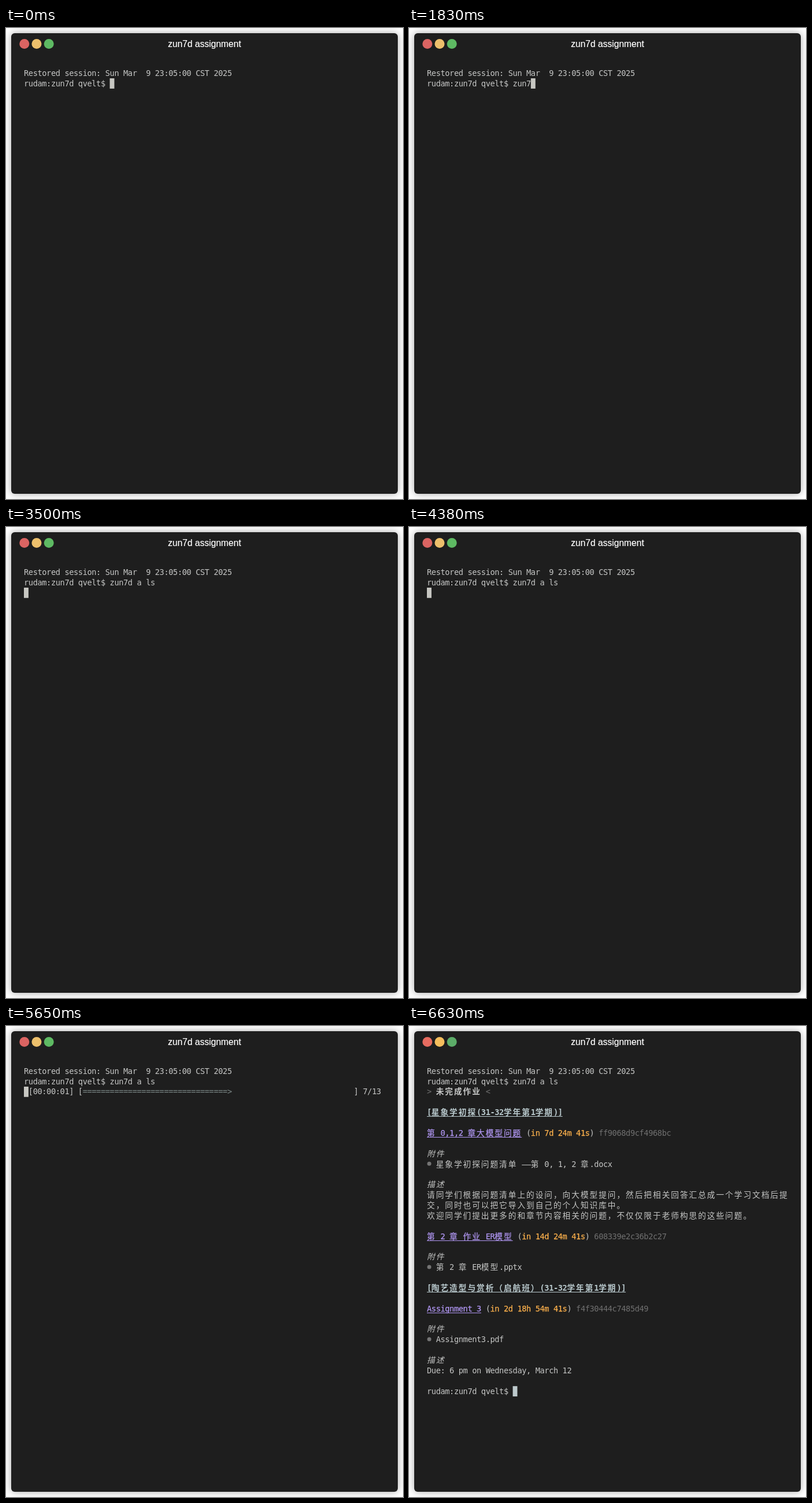
Write an HTML page that moves like this. It is 687x815 px and loops after 8000 ms.

```html
<!DOCTYPE html>
<html lang="zh-CN">
<head>
<meta charset="utf-8">
<title>Terminal</title>
<style>
  html, body { margin: 0; width: 100%; height: 100%; overflow: hidden; background: #fff; }
  #win { position: absolute; left: 9px; top: 9px; width: 669px; height: 797px; border-radius: 6px;
         background: #1e1e1e; box-shadow: 0 0 14px rgba(0, 0, 0, .34); }
  svg { position: absolute; left: 0; top: 0; display: block; }
  text { white-space: pre; }
  .title { font: 15.6px "Liberation Sans", Arial, sans-serif; fill: #fff; text-anchor: middle;
           stroke: #fff; stroke-width: .2px; }
  #screen text { font: 13.7px "DejaVu Sans Mono", "Noto Sans CJK SC", "Noto Sans CJK", monospace; fill: #c5c6c5; }
  #screen .bold { font-weight: bold; }
  #screen .ital { font-style: italic; }
  #screen .head { font-weight: bold; fill: #b9c9cd; }
  #screen .link { fill: #b096f2; stroke: #b096f2; stroke-width: .25px; }
  #screen .due { fill: #fbb04c; stroke: #fbb04c; stroke-width: .25px; }
  #screen .dim { fill: #707070; }
  #screen .bar { fill: #7d8988; }
</style>
</head>
<body>
<div id="win"></div>
<svg width="687" height="815" viewBox="0 0 687 815">
  <g id="dots"></g>
  <text class="title" x="343.5" y="33">zun7d assignment</text>
  <g id="screen"></g>
</svg>
<script>
const LOOP = 8000;
const LEFT = 31, TOP = 69.2, CELL = 7.82, ROW = 17.87, BASE = 13.5;
const PROMPT = "rudam:zun7d qvelt$ ";
const COMMAND = "zun7d a ls";
const KEYS = [1360, 1420, 1680, 1830, 2060, 2230, 2320, 2420, 2730, 2850];
const ENTER = 3500, BAR = 4600, DONE = 6630;

// Progress: time, position, length
const STEPS = [
  [BAR, 0, 2], [4840, 1, 2], [5000, 2, 2],
  [5200, 4, 13], [5490, 6, 13], [5650, 7, 13], [5830, 8, 13], [6460, 9, 13]
];

const TERM = "(31-32学年第1学期)";
const files = ["附件", "ital"], about = ["描述", "ital"];
const task = (name, left, id) =>
  [[name, "link"], [" ("], ["in " + left, "due"], [") "], [id, "dim"]];
const course = name => [["[" + name + TERM + "]", "head"]];
const file = name => [["●", "dim"], [" " + name]];

// Rows of styled runs, starting under the command line
const REPORT = [
  [["> ", "dim"], ["未完成作业", "bold"], [" <", "dim"]],
  [],
  course("星象学初探"),
  [],
  task("第 0,1,2 章大模型问题", "7d 24m 41s", "ff9068d9cf4968bc"),
  [],
  [files],
  file("星象学初探问题清单 ——第 0, 1, 2 章.docx"),
  [],
  [about],
  [["请同学们根据问题清单上的设问，向大模型提问，然后把相关回答汇总成一个学习文档后提"]],
  [["交，同时也可以把它导入到自己的个人知识库中。"]],
  [["欢迎同学们提出更多的和章节内容相关的问题，不仅仅限于老师构思的这些问题。"]],
  [],
  task("第 2 章 作业 ER模型", "14d 24m 41s", "608339e2c36b2c27"),
  [],
  [files],
  file("第 2 章 ER模型.pptx"),
  [],
  course("陶艺造型与赏析（启航班）"),
  [],
  task("Assignment 3", "2d 18h 54m 41s", "f4f30444c7485d49"),
  [],
  [files],
  file("Assignment3.pdf"),
  [],
  [about],
  [["Due: 6 pm on Wednesday, March 12"]],
  [],
  [[PROMPT]]
];

const dots = document.getElementById("dots");
const screen = document.getElementById("screen");

function add(parent, tag, attrs, content) {
  const el = document.createElementNS("http://www.w3.org/2000/svg", tag);
  for (const k in attrs) el.setAttribute(k, attrs[k]);
  if (content) el.textContent = content;
  parent.appendChild(el);
}

const colX = col => LEFT + col * CELL;
const rowY = row => TOP + row * ROW;
const span = ch => ch.codePointAt(0) >= 0x2e80 ? 2 : 1;

// Draws one run on the character grid and returns the next free column
function run(row, col, content, style = "") {
  if (content === "●") {
    add(screen, "circle", { cx: colX(col) + 4, cy: rowY(row) + 8.3, r: 3.5, fill: "#747474" });
    return col + 1;
  }
  const start = col, xs = [];
  for (const ch of content) {
    xs.push(colX(col).toFixed(2));
    col += span(ch);
  }
  add(screen, "text", { x: xs.join(" "), y: rowY(row) + BASE, class: style }, content);
  if (style === "link" || style === "head") {
    add(screen, "rect", {
      x: colX(start), y: Math.round(rowY(row) + 15.6), width: (col - start) * CELL, height: 1,
      fill: style === "link" ? "#b096f2" : "#b9c9cd"
    });
  }
  return col;
}

function line(row, runs) {
  return runs.reduce((col, [content, style]) => run(row, col, content, style), 0);
}

function cursor(row, col, fill = "#c7c7c2") {
  add(screen, "rect", { x: colX(col), y: rowY(row), width: 7.9, height: 17.8, fill });
}

function lights(done) {
  const fills = done ? ["#e76c60", "#f5be5d", "#5cac68"] : ["#db6462", "#edc06c", "#5eba63"];
  dots.replaceChildren();
  fills.forEach((fill, i) => add(dots, "circle", { cx: 31.8 + i * 21.2, cy: 27.4, r: 8.5, fill }));
}

function progress([, pos, len], secs) {
  const full = Math.floor(60 * pos / len);
  const bar = "=".repeat(full) + (full < 60 ? ">" : "");
  line(2, [[" [00:00:0" + secs + "] ["], [bar.padEnd(60), "bar"], ["] " + pos + "/" + len]]);
}

let shown = "";

function draw(t) {
  const typed = KEYS.filter(k => k <= t).length;
  const step = STEPS.filter(s => s[0] <= t).pop();
  const secs = t >= BAR + 1000 ? 1 : 0;
  const done = t >= DONE;
  const key = [typed, t >= ENTER, step, secs, done].join();
  if (key === shown) return;
  shown = key;

  lights(done);
  screen.replaceChildren();
  run(0, 0, "Restored session: Sun Mar  9 23:05:00 CST 2025");
  const end = run(1, 0, PROMPT + COMMAND.slice(0, typed));
  if (done) {
    REPORT.forEach((runs, i) => line(i + 2, runs));
    cursor(REPORT.length + 1, PROMPT.length, "#bdc9cc");
  } else if (t >= ENTER) {
    if (step) progress(step, secs);
    cursor(2, 0);
  } else {
    cursor(1, end);
  }
}

const began = performance.now();
function tick() {
  draw((performance.now() - began) % LOOP);
  requestAnimationFrame(tick);
}
tick();
</script>
</body>
</html>
```
